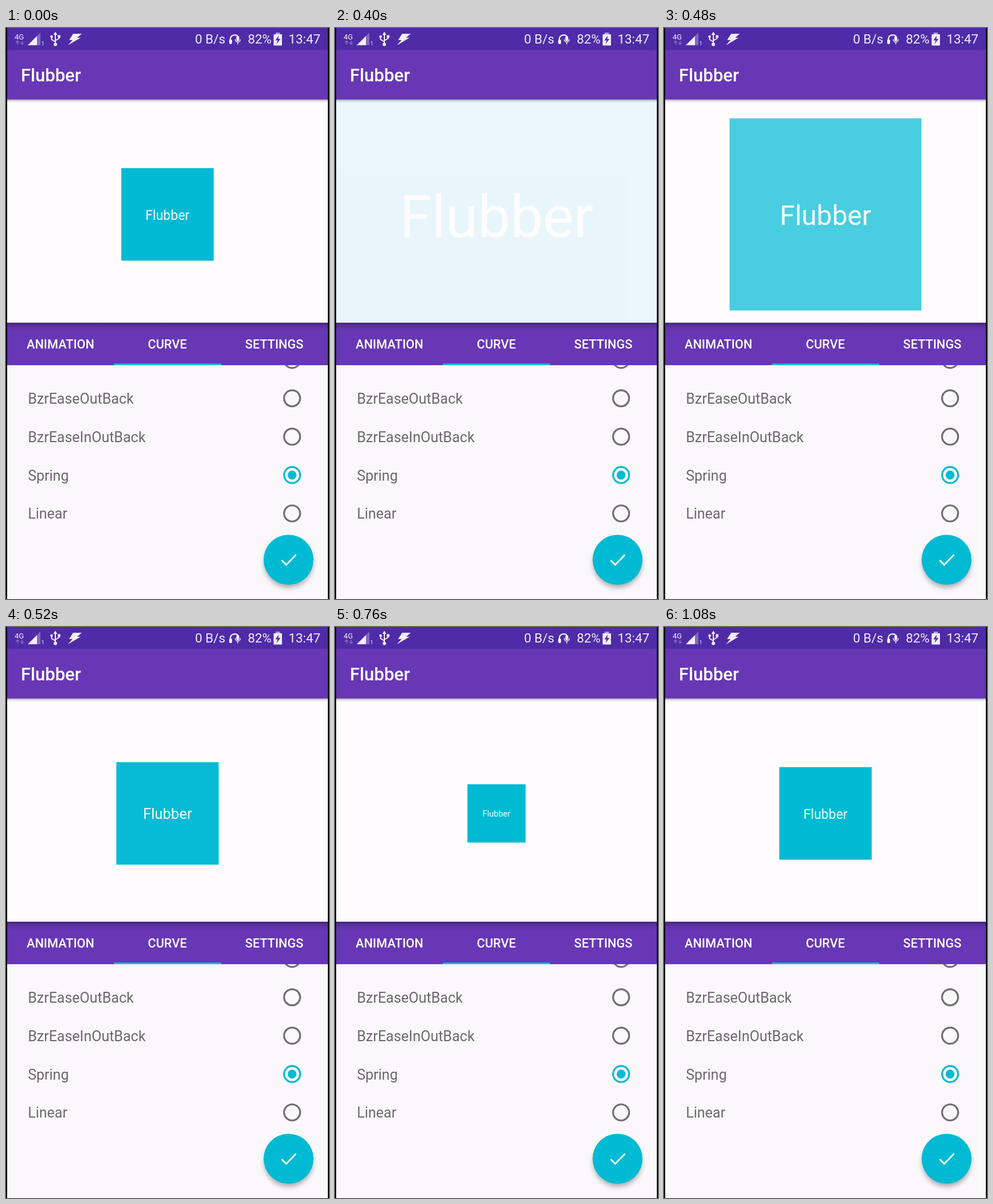
Recreate the animation shown at these times as an HTML page. Size 563 by 994 pixels, loop 1120 ms.

```html
<!DOCTYPE html>
<html lang="en">
<head>
<meta charset="utf-8">
<title>Curve demo</title>
<style>
  html, body { margin: 0; width: 100%; height: 100%; overflow: hidden; background: #000; }
  svg { display: block; width: 100vw; height: 100vh; font-family: Roboto, sans-serif; }
  .status { font-size: 22.3px; fill: #f3effa; }
  .tab { font-size: 21.7px; font-weight: 500; fill: #fff; text-anchor: middle; }
  .row { font-size: 25px; fill: #6b696d; }
  .ring { fill: none; stroke: #706e72; stroke-width: 3.2; }
  .on { stroke: #00bad4; }
</style>
</head>
<body>
<svg viewBox="0 0 563 994">
  <defs>
    <linearGradient id="drop" x2="0" y2="1">
      <stop offset="0" stop-color="#000" stop-opacity=".32"/>
      <stop offset=".45" stop-color="#000" stop-opacity=".1"/>
      <stop offset="1" stop-color="#000" stop-opacity="0"/>
    </linearGradient>
    <filter id="blur" x="-30%" y="-30%" width="160%" height="160%">
      <feGaussianBlur stdDeviation="5"/>
    </filter>
    <clipPath id="panel"><rect x="2" y="124" width="559" height="389"/></clipPath>
    <clipPath id="listArea"><rect x="2" y="587" width="559" height="407"/></clipPath>
  </defs>

  <rect width="563" height="994" fill="#000"/>
  <rect x="2" y="124" width="559" height="389" fill="#fefcff"/>

  <g clip-path="url(#panel)">
    <g id="box">
      <rect x="-80.5" y="-80.5" width="161" height="161" fill="#00bad4"/>
      <text y="9" font-size="23" fill="#f4fdfe" text-anchor="middle">Flubber</text>
    </g>
  </g>

  <rect x="2" width="559" height="38" fill="#4f2ba7"/>
  <rect x="2" y="38" width="559" height="86.5" fill="#6737b5"/>
  <rect x="2" y="124.5" width="559" height="6" fill="url(#drop)"/>
  <text x="26" y="93" font-size="31" font-weight="500" fill="#fff">Flubber</text>

  <g class="status">
    <text x="15" y="19.5" font-size="13">4G</text>
    <path d="M20 29V23M17 25.5l3-3 3 3M28 22v6M25 25.5l3 3 3-3" fill="none" stroke="#8267c4" stroke-width="1.6"/>
    <path d="M38 30L60 8V30Z" fill="#8267c4"/>
    <path d="M38 30L54 14V30Z"/>
    <text x="61.5" y="30" font-size="9">1</text>
    <g fill="none" stroke="#f3effa" stroke-width="2">
      <path d="M86 11V28M79.5 16v4l6.5 4M92.5 15v3l-6.5 4"/>
    </g>
    <path d="M82.500 12L86 6.500 89.500 12Z"/>
    <circle cx="86" cy="28.500" r="3"/>
    <circle cx="79.500" cy="15" r="2.300"/>
    <rect x="90.300" y="12.500" width="4.500" height="4.500"/>
    <path d="M117 10H132L124 17H130L108 30L116 21H110Z"/>
    <text x="329.500" y="27">0 B/s</text>
    <path d="M391 25V19a7.500 7.500 0 0 1 14 -3" fill="none" stroke="#f3effa" stroke-width="2.200"/>
    <rect x="389" y="20" width="5" height="8" rx="2"/>
    <rect x="401.500" y="14" width="5" height="9" rx="2.500"/>
    <path d="M399.500 19.500a4.500 5 0 0 0 9 0M404 24.500v4" fill="none" stroke="#f3effa" stroke-width="1.500"/>
    <text x="421.500" y="27">82%</text>
    <path d="M466.500 11H481V30.500H466.500Z"/>
    <path d="M470 8h7.500v3h-7.500Z" opacity=".6"/>
    <path d="M475.500 13L469.500 21.500H473.500L471.500 28L478.500 19H474.500Z" fill="#4f2ba7"/>
    <text x="492.500" y="27">13:47</text>
  </g>

  <rect x="2" y="587" width="559" height="407" fill="#faf8fb"/>
  <g id="list" clip-path="url(#listArea)"></g>

  <rect x="2" y="513" width="559" height="74" fill="#6737b5"/>
  <rect x="2" y="513" width="559" height="15" fill="url(#drop)"/>
  <text class="tab" x="95" y="558">ANIMATION</text>
  <text class="tab" x="281.300" y="558">CURVE</text>
  <text class="tab" x="467.600" y="558">SETTINGS</text>
  <rect x="188" y="584" width="187" height="3" fill="#00bad4"/>

  <circle cx="492.500" cy="932" r="42" fill="#000" opacity=".33" filter="url(#blur)"/>
  <circle cx="492.500" cy="925.700" r="43.500" fill="#00bad4"/>
  <path d="M480.500 926.500L488.500 934.500L505.500 917" fill="none" stroke="#fff" stroke-width="2.700"/>
</svg>
<script>
const LOOP = 1120, STEP = 40, START = 360;
const START_SCALE = 4.7;
const HALF_PERIOD = 332, REBOUND = 0.197;
const SETTLE_FROM = 858, SETTLE_TO = 1080;

const box = document.getElementById('box');

document.getElementById('list').innerHTML =
  ['BzrEaseInBack', 'BzrEaseOutBack', 'BzrEaseInOutBack', 'Spring', 'Linear']
    .map((name, i) => {
      const y = 577.8 + i * 66.8, on = name === 'Spring';
      return `<text class="row" x="38.2" y="${y + 9.4}">${name}</text>
        <circle class="ring${on ? ' on' : ''}" cx="498.7" cy="${y}" r="14"/>` +
        (on ? `<circle cx="498.7" cy="${y}" r="7.7" fill="#00bad4"/>` : '');
    }).join('');

// Damped spring released from rest: 1 at the start, settling to 0.
function spring(dt) {
  const decay = -Math.log(REBOUND) / HALF_PERIOD, omega = Math.PI / HALF_PERIOD;
  return Math.exp(-decay * dt) *
    (Math.cos(omega * dt) + decay / omega * Math.sin(omega * dt));
}

function offset(t) {
  if (t < START || t >= SETTLE_TO) return 0;
  if (t > SETTLE_FROM) {
    return 0.018 * Math.sin(Math.PI * (t - SETTLE_FROM) / (SETTLE_TO - SETTLE_FROM));
  }
  // The spring starts late and catches up.
  const lag = 50 * Math.exp(-(((t - START) / 115) ** 4));
  return spring(t - START + 50 - lag);
}

function draw(t) {
  const rest = offset(Math.floor(t / STEP) * STEP);
  const scale = 1 + (START_SCALE - 1) * rest;
  box.setAttribute('transform', `translate(281.5 324.5) scale(${scale})`);
  box.setAttribute('opacity', Math.min(1, Math.max(0, 1 - rest)));
}

const begin = performance.now();
function tick() {
  draw((performance.now() - begin) % LOOP);
  requestAnimationFrame(tick);
}
tick();
</script>
</body>
</html>
```
